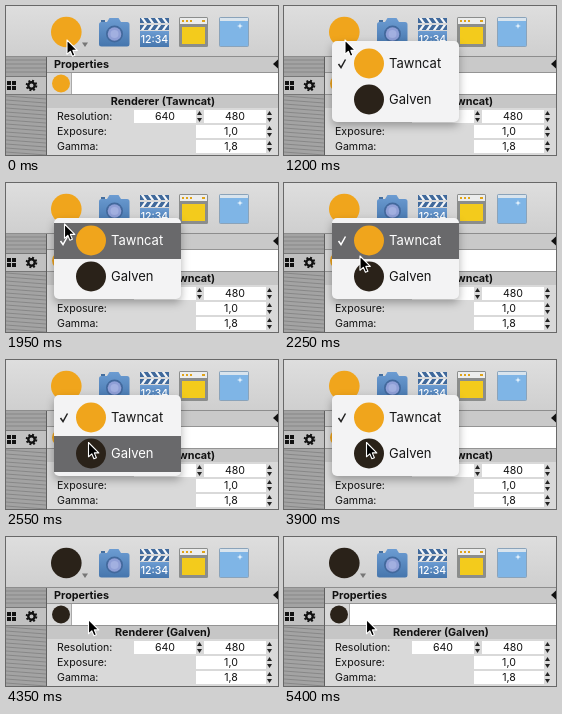
An HTML page for the animation above (7.35 s loop, 272 by 149 pixels).

```html
<!DOCTYPE html>
<html lang="en">
<head>
<meta charset="utf-8">
<title>Renderer menu</title>
<style>
  html, body { margin: 0; width: 100%; height: 100%; overflow: hidden; background: #d6d6d6; }
  svg { display: block; width: 100vw; height: 100vh; font-family: Inter, Roboto, sans-serif; }
  text { white-space: pre; }
  .label { font-size: 10.6px; fill: #111; }
  .bold { font-size: 10.8px; font-weight: 700; fill: #111; }
  .mid { text-anchor: middle; }
  .item { font-size: 13px; fill: #161616; }
  #menu { filter: drop-shadow(0 4px 4px rgba(0, 0, 0, .3)); }
</style>
</head>
<body>
<svg viewBox="0 0 272 149" preserveAspectRatio="none">
  <defs>
    <linearGradient id="bar" x2="0" y2="1"><stop stop-color="#dedede"/><stop offset="1" stop-color="#cfcfcf"/></linearGradient>
    <linearGradient id="blue" x2="0" y2="1"><stop stop-color="#6c9cd2"/><stop offset="1" stop-color="#4676ad"/></linearGradient>
    <clipPath id="slate"><path d="M134 12h29v5h-29zM134 19h29v5h-29z"/></clipPath>
    <clipPath id="view"><path d="M0 51h40v98H0z"/></clipPath>
  </defs>

  <!-- toolbar -->
  <rect width="272" height="50" fill="url(#bar)"/>
  <circle class="mark" cx="60.300" cy="26" r="15.300"/>
  <path d="M76 36.500h6l-3 4.500z" fill="#777"/>

  <g id="camera">
    <path d="M101 16l2.500-4h9l2.500 4h6a2.500 2.500 0 0 1 2.500 2.500V38a2.500 2.500 0 0 1-2.500 2.500H95.500A2.500 2.500 0 0 1 93 38V18.500A2.500 2.500 0 0 1 95.500 16z" fill="url(#blue)"/>
    <path d="M95 14h4v2h-4z" fill="#456f9f"/>
    <circle cx="108.500" cy="28" r="8.500" fill="#42689c"/>
    <circle cx="108.500" cy="28" r="6.800" fill="#8f9fd6"/>
    <circle cx="108.500" cy="28" r="4" fill="#a2b0e0"/>
  </g>

  <g id="clapper">
    <path d="M134 25h29v16h-29z" fill="url(#blue)"/>
    <g clip-path="url(#slate)">
      <path d="M134 12h29v12h-29z" fill="#f5f7f9"/>
      <g id="stripes" fill="none" stroke="#40699b" stroke-width="3.500"/>
    </g>
    <text class="mid" x="148.500" y="37" font-size="10.500" font-weight="500" fill="#fff">12:34</text>
  </g>

  <g id="panelicon">
    <rect x="173" y="11" width="29" height="30" rx="1.500" fill="#8b8d8c"/>
    <path d="M174 12h27v6h-27z" fill="#eceded"/>
    <path d="M176 14h2v2h-2zM180 14h2v2h-2zM184 14h2v2h-2zM196 14h3v2h-3z" fill="#e0a318"/>
    <path d="M176 21h23v17h-23z" fill="#f3cb1c"/>
  </g>

  <g id="windowicon">
    <rect x="213.500" y="11.500" width="29" height="29" rx="1" fill="#7fb5e6" stroke="#8aa3ba"/>
    <path d="M214 12h28v3h-28z" fill="#d9e4ed"/>
    <path d="M234 17l.700 2.300 2.300.700-2.300.700-.700 2.300-.700-2.300-2.300-.700 2.300-.700z" fill="#e8f4fd"/>
  </g>

  <!-- viewport -->
  <g clip-path="url(#view)">
    <path d="M0 51h40v98H0z" fill="#a3a3a3"/>
    <g id="grid" fill="none" stroke="#7c7c7c" stroke-width=".7"/>
    <path d="M0 71h40v17H0z" fill="#c1c1c1"/>
    <path d="M0 70.500h40M0 88.500h40" stroke="#777"/>
    <path d="M1 75h4v4H1zM6 75h4v4H6zM1 80h4v4H1zM6 80h4v4H6z" fill="#111"/>
    <circle cx="25.500" cy="79.500" r="3.200" fill="none" stroke="#111" stroke-width="2.400"/>
    <circle cx="25.500" cy="79.500" r="4.800" fill="none" stroke="#111" stroke-width="2" stroke-dasharray="1.900 1.870"/>
  </g>
  <path d="M0 50.500h272" stroke="#8d8d8d"/>

  <!-- properties -->
  <path d="M41 51h231v98H41z" fill="#d9d9d9"/>
  <path d="M41 51h231v15H41z" fill="#c9c9c9"/>
  <path d="M40.500 51v98" stroke="#5f5f5f"/>
  <path d="M41 66.500h231M41 88.500h231" stroke="#949494"/>
  <text class="bold" x="48" y="62">Properties</text>
  <path d="M272 53.500v9l-5-4.500z" fill="#111"/>
  <circle class="mark" cx="55" cy="77.500" r="9"/>
  <path d="M66 67h206v21H66z" fill="#fff"/>
  <path d="M65.500 67v21" stroke="#aaa"/>
  <path d="M41 89h231v13H41z" fill="#c6c6c6"/>
  <text id="title" class="bold mid" x="157" y="99"></text>
  <g id="rows"></g>

  <!-- popup -->
  <g id="menu">
    <rect x="48" y="35" width="127" height="81" rx="5" fill="#f3f3f4"/>
    <rect id="hi" x="48" width="127" height="36" fill="#69696b"/>
    <path id="check" d="M54.500 58l2.500 3.500 4.500-8" fill="none" stroke="#222" stroke-width="1.500"/>
    <circle id="icon0" cx="85" cy="57.500" r="15"/>
    <circle id="icon1" cx="85" cy="93.500" r="15"/>
    <text id="item0" class="item" x="105" y="62"></text>
    <text id="item1" class="item" x="105" y="98"></text>
  </g>

  <path id="cursor" d="M0 0V14.300L3.300 11.300 5.400 16.300 7.900 15.300 5.800 10.400H10.300Z" fill="#000" stroke="#fff" stroke-width="1.100" stroke-linejoin="round"/>
</svg>
<script>
const $ = id => document.getElementById(id);
const LOOP = 7350;
const engines = [
  { name: 'Tawncat', color: '#f0a51c' },
  { name: 'Galven', color: '#2a2219' }
];

// time, cursor x, cursor y, menu opacity, lit row (-1: none), engine
const steps = [
  [0, 61, 34, 0, -1, 0],
  [1200, 61, 34, 1, -1, 0],
  [1950, 58.5, 41, 1, 0, 0],
  [2100, 63, 55, 1, 0, 0],
  [2250, 76, 73, 1, 0, 0],
  [2400, 84, 85, 1, 1, 0],
  [2550, 82.5, 82.5, 1, 1, 0],
  [3900, 82.5, 82.5, 1, -1, 0],
  [4050, 82.5, 82.5, .5, 1, 0],
  [4200, 82.5, 82.5, 0, -1, 0],
  [4350, 82.5, 82.5, 0, -1, 1]
];

const line = d => `<path d="${d}"/>`;

function stepper(x, y) {
  return `<path d="M${x - 2.5} ${y - 1.5}h5l-2.500-4zM${x - 2.5} ${y + 1.5}h5l-2.500 4z" fill="#222"/>`;
}

function field(x, y, w, value) {
  return `<rect x="${x}" y="${y}" width="${w}" height="13" fill="#fff"/>` +
    `<text class="label mid" x="${x + w / 2}" y="${y + 10}">${value}</text>` +
    stepper(x + w + 3.5, y + 6.5);
}

function build() {
  const row = (y, name) => `<text class="label" x="51" y="${y + 10}">${name}</text>`;
  $('rows').innerHTML =
    row(104, 'Resolution:') + field(128, 104, 62, 640) + field(198, 104, 62, 480) +
    row(119, 'Exposure:') + field(190, 119, 70, '1,0') +
    row(134, 'Gamma:') + field(190, 134, 70, '1,8');

  let s = '';
  for (let x = 132; x < 168; x += 7) s += line(`M${x} 11l5 7M${x + 5} 18l-5 7`);
  $('stripes').innerHTML = s;

  let g = '';
  for (let y = 54; y < 70; y += 4) g += line(`M0 ${y}H40`);
  for (let y = 90; y < 149; y += 4) g += line(`M0 ${y}l40 3`);
  $('grid').innerHTML = g;

  engines.forEach((e, i) => {
    $('item' + i).textContent = e.name;
    $('icon' + i).setAttribute('fill', e.color);
  });
}

let last;
function draw(now) {
  const t = now % LOOP;
  const step = steps.findLast(s => s[0] <= t);
  if (step === last) return;
  last = step;
  const [, x, y, alpha, lit, engine] = step;
  $('cursor').setAttribute('transform', `translate(${x} ${y})`);
  $('menu').style.opacity = alpha;
  $('hi').style.opacity = lit < 0 ? 0 : 1;
  $('hi').setAttribute('y', lit === 1 ? 76 : 40);
  engines.forEach((e, i) => $('item' + i).style.fill = lit === i ? '#fff' : '#161616');
  $('check').style.stroke = lit === 0 ? '#fff' : '#222';
  $('title').textContent = `Renderer (${engines[engine].name})`;
  document.querySelectorAll('.mark').forEach(m => m.setAttribute('fill', engines[engine].color));
}

build();
draw(0);
const start = performance.now();
requestAnimationFrame(function tick() {
  draw(performance.now() - start);
  requestAnimationFrame(tick);
});
</script>
</body>
</html>
```
